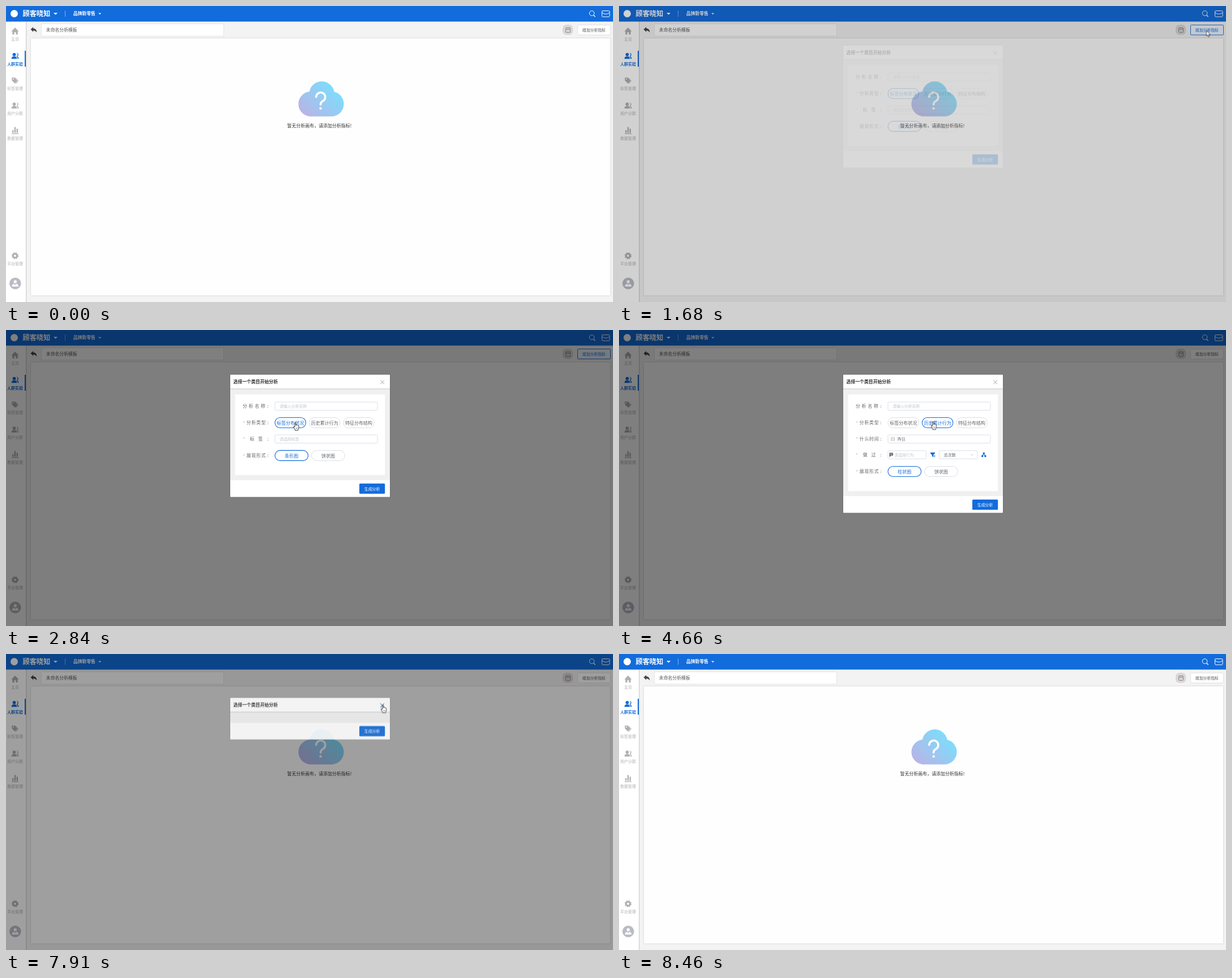
Animation of 1072 by 522 pixels, one loop 9.14 s. Source, as an HTML page:

```html
<!DOCTYPE html>
<html lang="zh-CN">
<head>
<meta charset="utf-8">
<title>分析模板</title>
<style>
  html, body { margin: 0; width: 100%; height: 100%; overflow: hidden; background: #f3f3f3; }
  svg { display: block; width: 1072px; height: 522px; }
  text { font-family: "Noto Sans CJK SC", "Noto Sans CJK", "Noto Sans CJK JP", sans-serif; white-space: pre; }
  .card { filter: drop-shadow(0 .6px .8px rgba(0, 0, 0, .2)); }
</style>
</head>
<body>
<svg id="stage" viewBox="0 0 1072 522"></svg>
<script>
const LOOP = 9140, BLUE = '#136cdb', GREY = '#606266', LINE = '#dcdfe6';

// Shapes. Text is placed by its vertical centre.
const text = (x, y, size, str, fill, extra = '') =>
  `<text x="${x}" y="${y + size * .37}" font-size="${size}" fill="${fill}" ${extra}>${str}</text>`;
const mid = (x, y, size, str, fill, extra = '') => text(x, y, size, str, fill, `text-anchor="middle" ${extra}`);
const rect = (x, y, w, h, fill, extra = '') =>
  `<rect x="${x}" y="${y}" width="${w}" height="${h}" fill="${fill}" ${extra}/>`;
const path = (d, extra) => `<path d="${d}" ${extra}/>`;
const line = (d, color, width = 1, extra = '') =>
  path(d, `fill="none" stroke="${color}" stroke-width="${width}" ${extra}`);
const circle = (x, y, r, extra) => `<circle cx="${x}" cy="${y}" r="${r}" ${extra}/>`;
const at = (x, y, body) => `<g transform="translate(${x} ${y})">${body}</g>`;

const icons = {
  home: path('M-6.5 .8L0-6 6.5.8H4.7V6.2H1.4V2.2H-1.4V6.2H-4.7V.8Z'),
  people: circle(-1.5, -2.4, 2.9) + path('M-6.4 5.2Q-6.2 1.2-2.6.8H-.4Q3.2 1.2 3.4 5.2Z') +
    path('M2-5.2A2.9 2.9 0 0 1 2.6.4Q4.4 1.8 4.6 5.2H6.4Q6.3 1.6 3.6.6A2.9 2.9 0 0 0 2-5.2Z'),
  tag: path('M-5.6-5.2H-1L4.2 0-.6 5-5.6-.2ZM.6-5.2L6 .2 1.4 5.6.4 4.6 4.9.1-.6-5.2Z') +
    circle(-3, -2.8, 1, 'fill="#fff"'),
  bars: path('M-6 5H6.2V6.2H-6ZM-4.9-.6H-2.5V4H-4.9ZM-1.2-6H1.2V4H-1.2ZM2.6-3H5V4H2.6Z'),
  gear: circle(0, 0, 3.3, 'fill="none" stroke="currentColor" stroke-width="2.8"') +
    circle(0, 0, 5.1, 'fill="none" stroke="currentColor" stroke-width="1.9" stroke-dasharray="2.4 1.605"')
};
const navItem = (icon, y, label, active) => {
  const color = active ? BLUE : '#b0b0b0';
  return `<g fill="${color}" color="${color}">${at(16, y, icons[icon])}</g>` +
    mid(16, y + 14, 6.9, label, color, active ? 'font-weight="700"' : '');
};

const chrome = () =>
  rect(0, 0, 1072, 522, '#f3f3f3') +
  `<g class="card">${rect(44, 57, 1023, 453.5, '#fefefe')}</g>` +
  `<g class="card">${rect(0, 27, 35, 495, '#fff')}</g>` + rect(35, 27, 1.5, 495, '#000', 'opacity=".07"') +
  rect(0, 0, 1072, 27.5, BLUE) +
  circle(14.5, 13.5, 6.5, 'fill="#fff"') +
  text(29.5, 13.5, 12.2, '顾客晓知', '#fff', 'font-weight="900"') +
  path('M84 12H91L87.5 15.4Z', 'fill="#fff"') +
  rect(104, 8, .8, 11, '#fff', 'opacity=".6"') +
  text(118.7, 13.5, 7.85, '品牌新零售', '#fff', 'font-weight="700"') +
  path('M163.2 12.5H168.2L165.7 15Z', 'fill="#fff"') +
  circle(1034.6, 12.8, 4.3, 'fill="none" stroke="#fff"') + line('M1037.6 16L1040.6 19', '#fff', 1.4) +
  rect(1052.5, 8.5, 13.5, 10.5, 'none', 'rx="1.5" stroke="#fff"') + line('M1053 12Q1059 16.5 1065.6 12', '#fff') +
  navItem('home', 44, '主页') + navItem('people', 88, '人群实验', true) +
  navItem('tag', 131.5, '标签管理') + navItem('people', 175.5, '用户分群') +
  navItem('bars', 219.5, '数据管理') + navItem('gear', 440.5, '平台管理') +
  rect(33, 79, 2, 28, BLUE) +
  circle(16.3, 489.3, 10.3, 'fill="#b9bcc4"') + circle(16.3, 486.3, 2.7, 'fill="#fff"') +
  path('M10.3 494.8Q11 490 14.4 490L16.3 492 18.2 490Q21.6 490 22.3 494.8Z', 'fill="#fff"') +
  path('M43.5 41.3L48.2 37V39.6Q54.3 40 54.3 46.8 52.3 43.2 48.2 43.2V45.8Z', 'fill="#444"') +
  rect(62.5, 31.5, 322, 21.5, '#fff', 'stroke="#e6e6e6"') +
  text(70.8, 42.3, 7.85, '未命名分析模板', '#555') +
  rect(983, 33, 18.3, 18, '#dad7d7', 'rx="7"') +
  rect(988.5, 38.5, 8, 8, 'none', 'rx="1" stroke="#8b8486"') + line('M990.5 38.5V41.5H994.7V38.5', '#8b8486', .9) +
  addButton('#fff', '#dfdfdf', '#555') +
  `<g id="addHot">${addButton('#eef5fd', BLUE, BLUE)}</g>`;

const addButton = (fill, stroke, color) =>
  rect(1009.5, 33.5, 58, 17.5, fill, `rx="1" stroke="${stroke}" stroke-width=".9"`) +
  mid(1038.4, 42.4, 6.85, '增加分析指标', color);

const emptyState = () =>
  path('M536 194.7A22 22 0 0 1 535.8 151 22.3 22.3 0 0 1 579.6 151.3 22 22 0 0 1 575.5 194.7Z', 'fill="url(#sky)"') +
  line('M547.8 160.3A8 8 0 1 1 559.8 167.5Q555.6 169.8 555.6 174', '#fff', 3.6, 'stroke-linecap="round"') +
  circle(555.6, 180.6, 2.2, 'fill="#fff"') +
  text(496.6, 211.2, 7.95, '暂无分析画布，请添加分析指标!', '#333');

// Dialog parts.
const label = (x, y, str, gap, required = true) =>
  (required ? text(418.6, y + .5, 7.5, '*', '#f29b62') : '') +
  text(x, y, 7.85, str, GREY, `letter-spacing="${gap}"`) + text(461.6, y, 8, ':', GREY);
const pill = (x, y, w, str, active) =>
  rect(x, y - 9, w, 18, '#fff', `rx="9" stroke="${active ? BLUE : LINE}" stroke-width="${active ? 1.1 : 1}"`) +
  mid(x + w / 2, y + .2, 8, str, active ? BLUE : GREY);
const field = (x, y, w) => rect(x, y - 7.2, w, 14.4, '#fff', `rx="1.5" stroke="${LINE}"`);
const hint = (x, y, str) => text(x, y, 6.85, str, '#c0c4cc');

const typeRows = active =>
  label(418, 134.2, '分析名称', 2.85, false) + field(475, 134.3, 181) + hint(483.3, 134.5, '请输入分析名称') +
  label(424.7, 163.5, '分析类型', .85) +
  ['标签分布状况', '历史累计行为', '特征分布结构'].map((s, i) => pill(475 + i * 60.4, 163.5, 54.5, s, i === active)).join('');
const chartRow = (y, first) =>
  label(424.7, y, '展现形式', .85) + pill(475, y, 58.6, first, true) + pill(539.6, y, 58.6, '饼状图');

const tagForm = () => typeRows(0) + label(430.7, 192.2, '标签', 7) +
  field(475, 192.2, 181) + hint(483.3, 192.4, '请选择标签') + chartRow(221.4, '条形图');
const historyForm = () => typeRows(1) +
  label(424.7, 192.2, '什么时间', .85) + field(475, 192.2, 181) +
  rect(480.8, 189.8, 5.8, 5, 'none', 'stroke="#aaa" stroke-width=".8"') + line('M482 192.2H485.4', '#aaa', .8) +
  text(492, 192.3, 6.85, '昨日', GREY) +
  label(430.7, 220, '做过', 7) + field(475, 220, 67.5) +
  path('M477.5 216.5H484V221.5H480.6L478.6 223.5H477.5Z', 'fill="#666"') + line('M479 218.2H483M479 220H482', '#ddd', .6) +
  hint(486.3, 220.2, '请选择行为') +
  path('M550 216H558V217.6L555.3 220.2V224L552.7 222.7V220.2L550 217.6Z', `fill="${BLUE}"`) +
  line('M556 221.5H558.5M556 223.4H558.5', BLUE, .9) +
  field(565.4, 220, 67.5) + text(573.8, 220.2, 7, '总次数', GREY) +
  line('M621 218.8L623.3 221.2 625.6 218.8', '#c0c4cc', .9) +
  rect(642.8, 216, 3, 3, BLUE) + rect(640.2, 221, 3, 3, BLUE) + rect(645.4, 221, 3, 3, BLUE) +
  line('M644.3 218V220.2M641.7 222V220.2H646.9V222', BLUE, .9) +
  chartRow(249.5, '柱状图');
const featureForm = () => typeRows(2) + chartRow(192.2, '柱状图');

const dialog = (id, bottom, form) =>
  `<g id="${id}"><g class="card">${rect(396, 78.8, 282, bottom - 78.8, '#fff', 'rx="1"')}</g>` +
  rect(396, 104, 282, bottom - 133.6, '#f0f0f0') + rect(396, 103.4, 282, 1, '#c4c6c9') +
  (form ? rect(404.6, 113.5, 264.6, bottom - 152, '#fff') + form : '') +
  text(401.6, 91.2, 7.85, '选择一个类目开始分析', '#303133', 'font-weight="700"') +
  rect(624, bottom - 23.6, 45.2, 18, BLUE, 'rx="1.5"') +
  mid(646.6, bottom - 14.4, 6.95, '生成分析', '#fff', 'font-weight="500"') + '</g>';
const cross = color => line('M661.2 88.6L668 95.4M668 88.6L661.2 95.4', color, .9);

const pointer = `<g id="cursor"><g id="arrow">${
  path('M0 0V9.6L2.2 7.6 3.7 11 5.3 10.3 3.8 7H6.8Z', 'fill="#fff" stroke="#222" stroke-width=".8"')
}</g><g id="hand">${
  path('M-1 .9Q0-.6 1 .9V5.2L1.2 4.2Q2.4 3.7 2.8 4.8 4 4.2 4.4 5.4 6 5 6 6.6V9.6Q5.8 11.4 4.8 12.4V14H-.6V12.6L-3.1 8.6Q-3.6 6.8-2.2 7L-1 8.2Z',
    'fill="#fff" stroke="#222" stroke-width=".9" stroke-linejoin="round"') + line('M1.4 9V11.6M3.2 9V11.6', '#222', .5)
}</g></g>`;

stage.innerHTML =
  `<defs><linearGradient id="sky" x1="0" y1="1" x2="1" y2=".2">
    <stop offset=".08" stop-color="#b9b3e6"/><stop offset=".85" stop-color="#80dbfa"/></linearGradient></defs>` +
  chrome() + emptyState() + rect(0, 0, 1072, 522, '#000', 'id="mask"') +
  `<g id="modal">${dialog('tagView', 294.4, tagForm())}${dialog('historyView', 322.5, historyForm())}` +
  `${dialog('featureView', 265.2, featureForm())}${dialog('emptyView', 152.2, '')}` +
  `${cross('#909399')}<g id="crossHot">${cross(BLUE)}</g></g>` + pointer;

// Timelines: each key is [ms, css, easing to the next key].
const sheet = document.head.appendChild(document.createElement('style'));
function animate(id, keys) {
  const [, firstCss] = keys[0], lastCss = keys[keys.length - 1][1];
  const all = [...(keys[0][0] ? [[0, firstCss]] : []), ...keys, [LOOP, lastCss]];
  const frames = all.map(([ms, css, ease = 'linear']) =>
    `${(ms / LOOP * 100).toFixed(4)}%{${css};animation-timing-function:${ease}}`).join('');
  sheet.append(`@keyframes ${id}{${frames}}#${id}{animation:${id} ${LOOP}ms infinite}\n`);
}
const show = (id, ...spans) => animate(id, [[0, 'opacity:0', 'step-end'],
  ...spans.flatMap(([from, to]) => [[from, 'opacity:1', 'step-end'], [to, 'opacity:0', 'step-end']])]);

const OPEN = 1635, CLOSE = 7875;
const raised = 'opacity:0;transform:translateY(-11.3px)', settled = 'opacity:1;transform:translateY(0px)';
animate('modal', [[OPEN, raised, 'ease'], [OPEN + 300, settled], [CLOSE, settled, 'ease'], [CLOSE + 300, raised]]);
animate('mask', [[OPEN, 'opacity:0', 'ease'], [OPEN + 200, 'opacity:.5'], [CLOSE, 'opacity:.5', 'ease'], [CLOSE + 200, 'opacity:0']]);
show('tagView', [OPEN, 4160], [6410, CLOSE]);
show('historyView', [4160, 5430]);
show('featureView', [5430, 6410]);
show('emptyView', [CLOSE, CLOSE + 300]);
show('crossHot', [7480, CLOSE + 300]);
show('addHot', [1280, 4160]);
show('arrow', [450, 2760], [7000, 7460], [8120, 8460]);
show('hand', [2760, 7000], [7460, 8120]);

const route = [
  [450, 935, 524, 'ease-in'], [800, 975, 260], [1100, 1022, 80, 'ease-out'], [1360, 1037.4, 43.4],
  [2310, 1037.4, 43.4, 'ease-in'], [2520, 820, 115], [2690, 570, 172, 'ease-out'], [2800, 511, 163],
  [2850, 511, 163], [2960, 506.5, 165], [3110, 511, 163],
  [3430, 511, 163, 'ease-in'], [3680, 535, 156, 'ease-out'], [3930, 554.5, 161.5],
  [4660, 554.5, 161.5, 'ease-in-out'], [5030, 606.5, 156.5, 'step-end'],
  [5230, 611, 156.5, 'step-end'], [5430, 611, 160.5],
  [5710, 611, 160.5, 'ease-in'], [5900, 565, 167, 'ease-out'], [6110, 519.5, 160.5, 'step-end'],
  [6260, 523.5, 160.5, 'step-end'], [6410, 526.2, 167.5],
  [6880, 526.2, 167.5, 'ease-in-out'], [7540, 665.6, 89.6],
  [8090, 665.6, 89.6, 'ease-in'], [8460, 900, 524]
];
animate('cursor', route.map(([ms, x, y, ease]) => [ms, `transform:translate(${x}px,${y}px)`, ease]));
</script>
</body>
</html>
```
